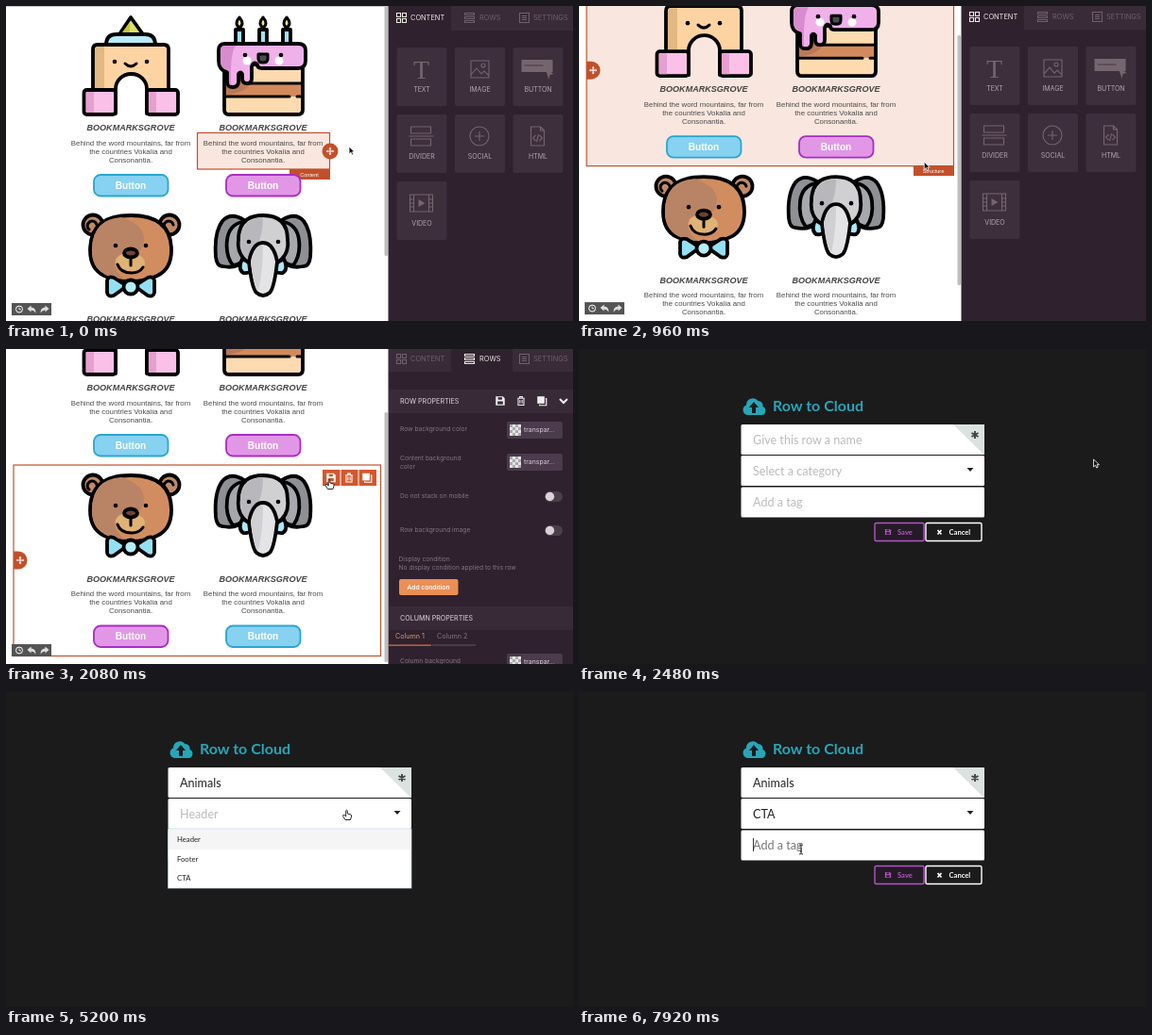
Write an HTML page that moves like this. It is 600 by 334 pixels and loops after 8 s.

```html
<!DOCTYPE html>
<html lang="en">
<head>
<meta charset="utf-8">
<title>Save a row to the cloud</title>
<style>
html,body{margin:0;width:100%;height:100%;overflow:hidden;background:#fff}
svg{display:block;width:100vw;height:100vh}
.page{font-family:"Liberation Sans",Arial,sans-serif}
.panel{font-family:Inter,sans-serif}
.modal{font-family:Lato,sans-serif}
.art{stroke:#000;stroke-width:3.8;stroke-linecap:round;stroke-linejoin:round}
.flat{stroke:none}
.line{fill:none;stroke:#75656f;stroke-width:1.1}
</style>
</head>
<body>
<svg id="stage" viewBox="0 0 600 334"></svg>
<script>
const LOOP = 8000, STEP = 80;
const ORANGE = '#c2502b', TINT = '#f9e7df', BLUE = ['#87d1f1', '#2ba5cf'], PINK = ['#e297e6', '#a92dc2'];

// y is the middle of the line
const text = (x, y, s, size, fill, more = '') =>
  `<text x="${x}" y="${y + size * .36}" font-size="${size}" fill="${fill}" ${more}>${s}</text>`;
const rect = (x, y, w, h, fill, more = '') =>
  `<rect x="${x}" y="${y}" width="${w}" height="${h}" fill="${fill}" ${more}/>`;
const path = (d, fill, more = '') => `<path d="${d}" fill="${fill}" ${more}/>`;
const dot = (x, y, r, fill, more = '') => `<circle cx="${x}" cy="${y}" r="${r}" fill="${fill}" ${more}/>`;
const group = (id, body, more = '') => `<g id="${id}" ${more}>${body}</g>`;
const at = (x, y, body, scale = 1) => `<g transform="translate(${x} ${y}) scale(${scale})">${body}</g>`;
const mid = 'text-anchor="middle"', bold = 'font-weight="700"', flat = 'class="flat"', thin = 'stroke-width="3"';
const eyes = (a, b, y) => dot(a, y, 2.3, '#000', flat) + dot(b, y, 2.3, '#000', flat);

/* ---------- icons, centred on 0,0 ---------- */
const save = (c, hole) => path('M-5-5H3L5-3V5H-5Z', c) + rect(-2.5, -4, 4.5, 2.6, hole) + rect(-3, .5, 6, 3.3, hole);
const trash = c => path('M-4-3H4M-1.5-3v-1.6h3V-3M-3.2-3V4.8H3.2V-3M-1.2-1v4M1.2-1v4', 'none', `stroke="${c}" stroke-width="1.1"`);
const copy = c => path('M-5-5H3V3H-5Z', c) + path('M4-2.5H5V5H-2.5V4', 'none', `stroke="${c}" stroke-width="1.3"`);
const move = path('M-4 0H4M0-4V4', 'none', 'stroke="#fff" stroke-width="1.4"') +
  path('M-5.2 0l2-2v4zM5.2 0l-2-2v4zM0-5.2l-2 2h4zM0 5.2l-2-2h4z', '#fff');
const actions = (x, y, gap, c, hole) =>
  at(x, y, save(c, hole), .95) + at(x + gap, y, trash(c), .95) + at(x + 2 * gap, y, copy(c), .95);

/* ---------- illustrations ---------- */
const castle = path('M92 89V46Q92 41 97 41H167Q172 41 172 46V89L149 114V88A16.5 16 0 0 0 116 88V114Z', '#fdd3a2') +
  path('M94 87V47Q94 43 98 43H104V87Z', '#e2b982', flat) +
  path('M106 41Q106 30 117 30H147Q158 30 158 41Z', '#b9ebfa') +
  path('M132 12L120 30H145Z', '#dde06a') + path('M131 17L123 28H131Z', '#c3c834', flat) +
  rect(82.5, 89, 33.5, 26, '#fac0e8', 'rx="3"') + rect(149, 89, 33, 26, '#fac0e8', 'rx="3"') +
  path('M85 91h8v22h-8zM151 91h8v22h-8z', '#e5a0cf', flat) +
  eyes(115, 149, 59) + path('M126 61q6 6 12 0', 'none', thin);
const candle = x => rect(x - 4, 25, 8, 15, '#9fe3f5') + path(`M${x} 12q6 7 0 11q-6-4 0-11Z`, '#f6e08a', thin);
const cake = [247, 272, 297].map(candle).join('') +
  path('M231 62V110q0 5 5 5H309q5 0 5-5V62Z', '#fddab0') + rect(233, 83, 79, 13, '#d28a5c', flat) +
  path('M233 69H262Q262 92 233 94Z', '#b9785a', flat) +
  path('M256 82H313M232 96H300M308 96h5', 'none', thin) +
  path('M225 47q0-7 7-7H309q8 0 8 7V58q0 8-8 8H271q-5 0-5-4q-4-4-6 2v13q0 5-5 5t-5-5v-5q-2-3-4 0v8q0 6-6 6t-6-6V70q-9-2-9-12Z', '#f0b0ea') +
  path('M227 47q0-5 5-5H243q-6 8-5 42-2 0-2-4V68q-9-2-9-10Z', '#d98bd0', flat) +
  dot(255, 58, 4.5, '#fff', flat) + dot(289, 58, 4.5, '#fff', flat) + eyes(253, 291, 52) +
  path('M267 51h10v5q0 4-5 4t-5-4Z', '#4a4a50', thin);
const ear = x => dot(x, 232, 10.5, '#c08a68') + path(`M${x - 4} 237a5 5 0 1 1 8-5`, 'none', thin);
const bear = ear(92) + ear(173) +
  path('M89 259Q89 222 132 222T175 259Q175 279 160 286Q148 292 132 292T104 286Q89 279 89 259Z', '#d18d60') +
  path('M91 259Q91 226 122 224Q148 232 146 250Q144 262 132 262Q114 262 115 274Q117 284 126 290Q91 288 91 259Z', '#b98466', flat) +
  path('M132 262Q116 262 116 272Q118 284 132 283Q146 282 147 272Q146 264 132 262Z', '#dfb277', flat) +
  path('M132 268v7M118 274q3 9 15 9q8 0 12-6', 'none', thin) +
  '<ellipse cx="132" cy="262" rx="7" ry="4.5" fill="#6e4232"/>' + eyes(116, 148, 254) +
  path('M128 297L114 288q-6-2-7 3v13q1 5 7 3ZM136 297l14-9q6-2 7 3v13q-1 5-7 3Z', '#93e0f5') +
  dot(132, 298, 7.5, '#b4eefb');
const side = path('M252 227Q238 218 229 228Q220 240 222 266Q223 276 229 276Q244 279 252 270Z', '#8f9095') +
  path('M250 229Q236 232 234 248Q232 264 240 275Q248 274 252 268Z', '#a7a8ad') +
  path('M250 268Q245 279 251 283Q260 284 264 276Z', '#a9e8f5');
const elephant = side + at(544, 0, side, '-1 1') +
  path('M246 248Q246 222 272 222T298 248Q300 264 287 272H257Q244 264 246 248Z', '#d0d0d3') +
  path('M272 224Q249 225 248 248Q247 262 257 270Q272 250 272 224Z', '#b8b8bc', flat) +
  path('M257 271Q261 251 272 251T287 271Q284 299 279 304Q272 310 265 304Q260 299 257 271Z', '#e4e4e6') +
  path('M272 253Q263 253 259 271Q262 296 267 302Q272 280 272 253Z', '#d0d0d3', flat) + eyes(257, 288, 250);

/* ---------- newsletter page ---------- */
const cell = (x, y, [fill, edge]) =>
  text(x, y + 129, 'BOOKMARKSGROVE', 9.05, '#444', `${mid} ${bold} font-style="italic"`) +
  ['Behind the word mountains, far from', 'the countries Vokalia and', 'Consonantia.']
    .map((s, i) => text(x, y + 145 + i * 9, s, 7.85, '#4a4a4a', mid)).join('') +
  rect(x - 39, y + 179, 78.5, 22.5, fill, `stroke="${edge}" stroke-width="1.8" rx="7"`) +
  text(x, y + 190, 'Button', 10.1, '#fff', `${mid} ${bold}`);
const tag = (x, y, s) => rect(x, y, 43, 11, ORANGE) + text(x + 21, y + 5.5, s, 5.6, '#fff', mid);
const handle = y => path(`M8 ${y - 9.5}h5a9.500 9.500 0 0 1 0 19h-5z`.replace(/\.500/g, '.5'), ORANGE) + at(15, y, move, .8);
const frame = (y, fill) => rect(8, y, 388.5, 202.5, fill, `stroke="${ORANGE}" stroke-width="1.2"`) + handle(y + 101);

const page =
  group('hoverText', rect(202.5, 134.5, 140, 38.5, TINT, `stroke="${ORANGE}" stroke-width="1.2"`) +
    tag(300, 173, 'Content') + dot(343, 154, 8.5, ORANGE) + at(343, 154, move, .8)) +
  group('hoverTop', frame(8, TINT) + tag(354, 210, 'Structure')) +
  group('hoverLow', frame(211, TINT) + tag(354, 413, 'Structure')) +
  group('picked', frame(211, 'none')) +
  `<g class="art">${castle}${cake}${bear}${elephant}</g>` +
  cell(132, 0, BLUE) + cell(272, 0, PINK) + cell(132, 202.5, PINK) + cell(272, 202.5, BLUE) +
  group('tools', rect(335, 216, 57, 17, '#d3572e') + path('M354 216v17M373 216v17', 'none', 'stroke="#fff"') +
    actions(344, 224.5, 19, '#fff', '#d3572e'));

const undoBar = rect(6, 315, 42, 13, '#545454') +
  dot(14, 321.5, 3.5, 'none', 'stroke="#fff"') + path('M14 319.5v2.3h2', 'none', 'stroke="#fff" stroke-width=".8"') +
  ['translate(27.5 321.5)', 'translate(40.5 321.5) scale(-1 1)'].map(m =>
    path('M-5-.5L-1-4V-2Q4-2 4 4Q2 1-1 1V3Z', '#ddd', `transform="${m}"`)).join('');

/* ---------- side panel ---------- */
const DIM = '#85757f';
const tabs = on => [[405, 413, 428, 'CONTENT'], [471, 485, 501, 'ROWS'], [536, 543, 558, 'SETTINGS']].map(([x, ix, tx, s], i) => {
  const c = i === on ? '#eee8e4' : '#6f606b';
  const icon = [
    'M.5 .5h4v4h-4zM6.5 .5h4v4h-4zM.5 6.5h4v4h-4zM6.5 6.5h4v4h-4z',
    'M.5 .5h10v2h-10zM.5 4.5h10v2h-10zM.5 8.5h10v2h-10z',
    'M.5 .5h10v10h-10zM3 3.5h5M3 5.5h5M3 7.5h5'][i];
  return rect(x, 0, [66, 65, 64][i], 26, i === on ? '#2f212e' : '#3a2b39') +
    at(ix, 7, path(icon, 'none', `stroke="${c}" stroke-width="1.1"`)) + text(tx, 12.5, s, 7.4, c);
}).join('');

const glyphs = [
  ['TEXT', '<text y="10" font-size="28" text-anchor="middle" fill="#75656f" font-family="Liberation Serif,serif">T</text>'],
  ['IMAGE', '<path class="line" d="M-9-9H10V9H-9ZM-9 6L-3-1 2 5 5 2 10 7"/><circle class="line" cx="4" cy="-4" r="2"/>'],
  ['BUTTON', '<path fill="#75656f" d="M-17-10H16V3H-17ZM8-1l9 6-4 1-1 5z"/><path class="line" style="stroke:#4b3b49" d="M-14-4H6"/>'],
  ['DIVIDER', '<path class="line" d="M-11-3V-10H10V-3ZM-13 0H13M-11 3V10H10V3Z"/>'],
  ['SOCIAL', '<circle class="line" r="10"/><path class="line" d="M-5 0H5M0-5V5"/>'],
  ['HTML', '<path class="line" d="M-7-10H3L7-6V10H-7ZM3-10V-6H7M-2-1l-3 3 3 3M2-1l3 3-3 3M1-2L-1 6"/>'],
  ['VIDEO', '<path class="line" d="M-12-9H12V9H-12ZM-8-9V9M8-9V9M-12-4h4M-12 0h4M-12 4h4M8-4h4M8 0h4M8 4h4"/><path fill="#75656f" d="M-3-4L4 0-3 4Z"/>']];
const tiles = glyphs.map(([s, g], i) => {
  const x = 413.5 + i % 3 * 61.5, y = 44 + Math.floor(i / 3) * 71;
  return rect(x, y, 53, 62, '#3e2f3d', 'rx="2"') + at(x + 26, y + 23, g) + text(x + 26.5, y + 44.5, s, 7, '#b3a5af', mid);
}).join('');

const label = (y, s, x = 417) => text(x, y, s, 6.7, DIM);
const picker = y => rect(530, y, 59, 18, '#4b3b4c', 'rx="2"') + rect(533, y + 3, 12, 12, '#e4e4e4') +
  [0, 1, 2, 3, 4, 5, 6, 7].map(i => rect(533 + i % 2 * 6 + (i >> 1) % 2 * 3, y + 3 + (i >> 1) * 3, 3, 3, '#aaa')).join('') +
  text(548, y + 9, 'transpar...', 6.9, '#d8ccd6');
const toggle = y => rect(570, y, 19, 11, '#4d3e4c', 'rx="5.5"') + dot(575.5, y + 5.5, 4.7, '#d9d2d7');
const band = (y, s) => rect(405, y, 195, 25, '#392a38') + text(417, y + 12, s, 7.1, '#c9bdc6', 'font-weight="500"');
const rows = band(45, 'ROW PROPERTIES') + actions(523, 57, 22, '#eee', '#392a38') +
  path('M586 55l4 4 4-4', 'none', 'stroke="#eee" stroke-width="2"') +
  label(87, 'Row background color') + picker(79) +
  label(118, 'Content background') + label(127, 'color') + picker(113) +
  label(158, 'Do not stack on mobile') + toggle(153) +
  label(194, 'Row background image') + toggle(189) +
  label(224.5, 'Display condition', 415.5) + label(233.5, 'No display condition applied to this row', 415.5) +
  rect(416, 246, 62.5, 17, '#ea8f55', 'rx="2"') + text(447, 254.5, 'Add condition', 6.7, '#fff', `${mid} font-weight="600"`) +
  band(275, 'COLUMN PROPERTIES') +
  text(412, 306.5, 'Column 1', 7.2, '#d29a80') + text(456, 306.5, 'Column 2', 7.2, DIM) +
  rect(405, 315.5, 45, 1.2, '#d9764a') + rect(451, 315.5, 46, 1, '#66565f') +
  label(333, 'Column background') + picker(325);

/* ---------- modal ---------- */
const cloud = path('M178 70a5.5 5.5 0 0 1-1-10.5a7 7 0 0 1 12.5-4.5a5 5 0 0 1 5 6a4.7 4.7 0 0 1-1 9Z', '#27a6b8') +
  path('M185 56l5 6h-3v6h-4v-6h-3z', '#1b1b1c');
const modal = rect(0, 0, 600, 334, '#1b1b1c') + cloud + text(205, 60.5, 'Row to Cloud', 16, '#27a6b8', bold) +
  [80, 113, 146.5].map(y => rect(171.5, y, 257.5, 32, '#fff', 'rx="1.5"')).join('') +
  path('M396 80H429V112.5Z', '#dbe2e0') +
  path('M419 87v8M415.5 89l7 4M415.5 93l7-4', 'none', 'stroke="#444" stroke-width="1.9"') +
  path('M410.5 126h7l-3.5 4z', '#222') +
  text(184, 96.5, '', 12.6, '#222', 'id="name"') + text(184, 129, '', 12.6, '#222', 'id="kind"') +
  text(184, 162, 'Add a tag', 12.6, '#bbb', 'id="label"') +
  rect(184, 0, .9, 14, '#222', 'id="caret"') +
  rect(313, 184.5, 52, 19, '#241b26', 'rx="1.5" stroke="#b653c6" stroke-width="1.4"') +
  at(327, 194, save('#b653c6', '#241b26'), .62) + text(337, 194, 'Save', 7.6, '#b653c6', bold) +
  rect(367, 184.5, 59, 19, 'none', 'rx="1.5" stroke="#fff" stroke-width="1.4"') +
  path('M379.5 192l4 4.5M383.5 192l-4 4.5', 'none', 'stroke="#fff" stroke-width="1.7"') +
  text(391.5, 194, 'Cancel', 7.6, '#fff', bold) +
  group('list', rect(171.5, 145, 257.5, 63, '#fff', 'stroke="#b9d8dc" stroke-width=".7"') +
    rect(172, 146, 256.5, 21, '#f5f5f5', 'id="mark"') +
    ['Header', 'Footer', 'CTA'].map((s, i) => text(181, 156.5 + i * 20.5, s, 7.7, '#222')).join(''));

const pointers =
  group('arrow', path('M0 0V8L2 6.2 3.2 9 4.7 8.3 3.5 5.7H6Z', '#111', 'stroke="#fff" stroke-width=".8"')) +
  group('hand', path('M-.8 .8Q0-.5 .8 .8V4L4.5 5Q5.2 5.2 5 7L4 10.5H-1.5L-4 6.5Q-4 5-2.5 5.5L-.8 7Z', '#fff', 'stroke="#111" stroke-width=".9"')) +
  group('beam', path('M-2-5Q0-5 0-4Q0-5 2-5M0-4V4M-2 5Q0 5 0 4Q0 5 2 5M-1 2H1', 'none', 'stroke="#222"'));

document.getElementById('stage').innerHTML =
  rect(0, 0, 600, 334, '#fff') + group('page', page, 'class="page"') +
  rect(400.5, 0, 3.5, 265, '#bdbdbd', 'id="bar" rx="1.5"') +
  group('app', rect(0, 0, 405, 1, '#ccc') + undoBar + rect(404.5, 0, 196, 340, '#2f212e') +
    group('content', tabs(0) + tiles) + group('rows', tabs(1) + rows), 'class="panel"') +
  group('modal', modal, 'class="modal"') + group('pointer', pointers);

/* ---------- timeline ---------- */
const el = {};
document.querySelectorAll('#stage [id]').forEach(e => el[e.id] = e);
const show = (id, on) => el[id].setAttribute('display', on ? 'inline' : 'none');
const put = (id, x, y) => el[id].setAttribute('transform', `translate(${x} ${y})`);
const ease = (t, a, b) => { const u = Math.min(1, Math.max(0, (t - a) / (b - a))); return u * u * (3 - 2 * u); };

const track = [[160, 363, 149], [640, 373.5, 140.5], [800, 373.5, 140.5], [1200, 350, 211], [1360, 350, 211],
  [1920, 342, 138], [2160, 342, 138], [2400, 544.5, 117], [2520, 544.5, 117], [2720, 418, 104], [3040, 300, 97],
  [4400, 300, 97], [4880, 360.5, 125], [5280, 360.5, 125], [5680, 240, 165], [5960, 150, 205], [6240, 192, 194],
  [6560, 192, 194], [7200, 235, 167]];
function cursorAt(t) {
  let [, x, y] = track[0];
  for (let i = 1; i < track.length; i++) {
    const [a, px, py] = track[i - 1], [b, qx, qy] = track[i], u = ease(t, a, b);
    if (t >= a) { x = px + (qx - px) * u; y = py + (qy - py) * u; }
  }
  return [x, y];
}

function draw(t) {
  const s = ease(t, 760, 1180), scroll = 88 * s, [x, y] = cursorAt(t);
  put('page', 0, -scroll);
  put('bar', 0, 67 * s);
  put('app', 0, -2 * s);

  const picked = t >= 1240, low = y + scroll > 211;
  show('hoverText', t < 160);
  show('hoverTop', t >= 160 && !picked && !low);
  show('hoverLow', !picked && low);
  show('picked', picked);
  show('tools', picked);
  show('content', t < 1440);
  show('rows', t >= 1440);

  const fade = ease(t, 2120, 2400), inModal = t >= 2240;
  show('modal', fade > 0);
  el.modal.setAttribute('opacity', fade);

  // name field: focus, then typing
  const typed = 'Animals'.slice(0, Math.max(0, Math.floor((t - 3440) / 120)));
  const nameFocus = t >= 3120 && t < 4880, tagFocus = t >= 7280;
  el.name.textContent = typed || 'Give this row a name';
  el.name.setAttribute('fill', typed ? '#222' : nameFocus ? '#777' : '#bbb');

  const open = t >= 4960 && t < 6400, chosen = t >= 6400;
  el.kind.textContent = chosen ? 'CTA' : open ? 'Header' : 'Select a category';
  el.kind.setAttribute('fill', chosen ? '#222' : '#bbb');
  show('list', open);
  const item = Math.min(2, Math.max(0, Math.floor((y - 146) / 20.5)));
  put('mark', 0, item * 20.5);

  el.label.setAttribute('fill', tagFocus ? '#777' : '#bbb');
  show('caret', nameFocus && (typed || t % 1000 < 500) || tagFocus && (t - 7280) % 1000 < 680);
  put('caret', nameFocus && typed ? el.name.getComputedTextLength() : 0, nameFocus ? 89.5 : 155);

  let kind = 'arrow';
  if (!inModal) kind = t >= 1840 && y < 146 ? 'hand' : 'arrow';
  else if (x > 172 && x < 429) kind = y < 113 || (!open && y > 146) ? 'beam' : 'hand';
  const hidden = t >= 3440 && t < 4400;
  ['arrow', 'hand', 'beam'].forEach(k => show(k, k === kind && !hidden));
  put('pointer', x, y);
}

function tick(now) {
  draw(Math.floor(now % LOOP / STEP) * STEP);
  requestAnimationFrame(tick);
}
draw(0);
requestAnimationFrame(tick);
</script>
</body>
</html>
```
